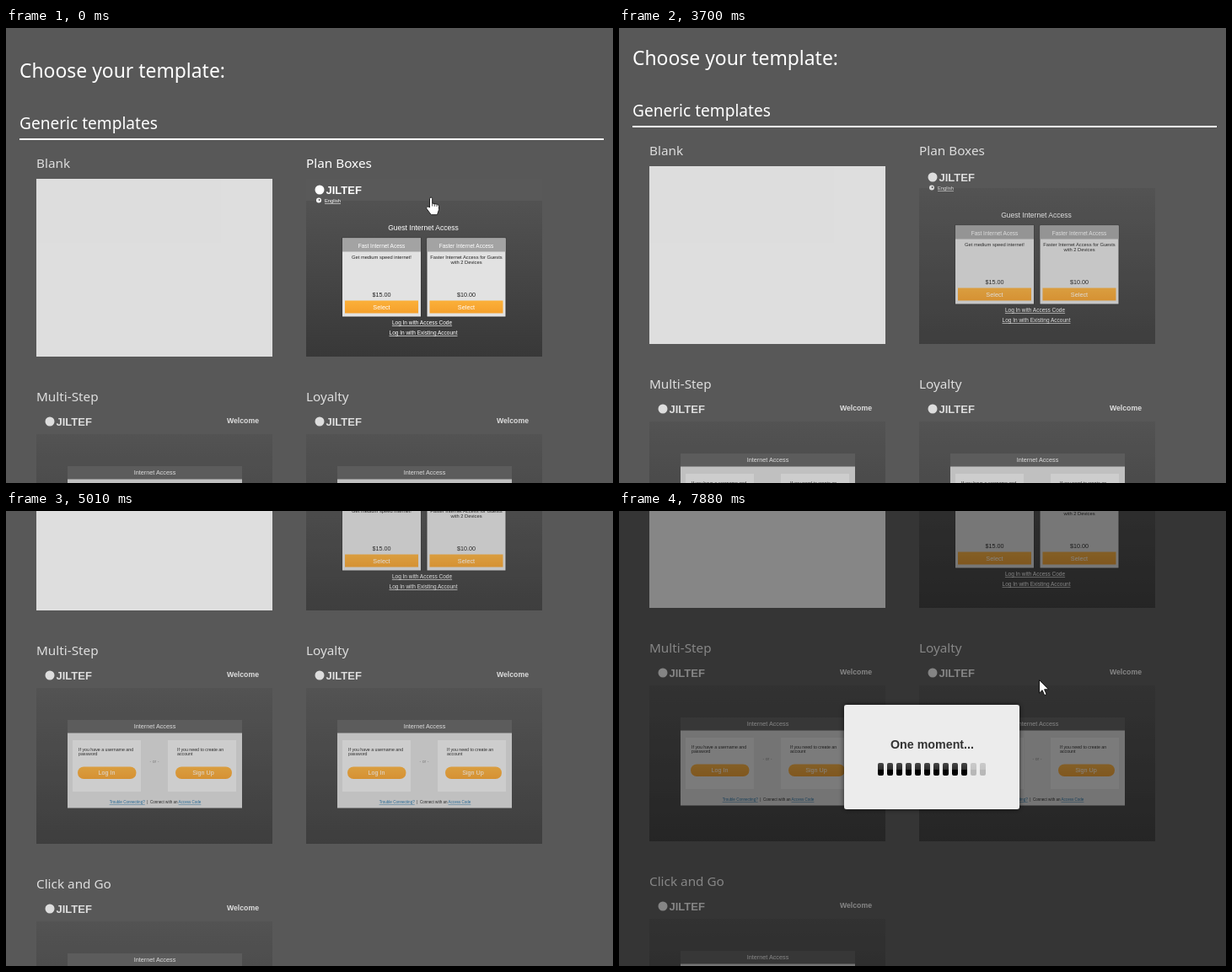
Write an HTML page that moves like this. It is 720 px wide and 540 px high and loops after 8000 ms.

```html
<!DOCTYPE html>
<html lang="en">
<head>
<meta charset="utf-8">
<title>Choose your template</title>
<style>
  html, body { margin: 0; width: 100%; height: 100%; overflow: hidden; background: #585858; }
  svg { display: block; width: 100vw; height: 100vh; }
  text { font-family: "Liberation Sans", Arial, sans-serif; fill: #fff; white-space: pre; }
  .heading { font-family: "Noto Sans", "Open Sans", sans-serif; }
  .item { font-size: 15.3px; }
  .mid { text-anchor: middle; }
  .dark { fill: #222; }
  .link { text-decoration: underline; }
  .blue { fill: #1d6fa5; }
  .bold { font-weight: bold; }
</style>
</head>
<body>
<svg viewBox="0 0 720 540">
  <defs>
    <linearGradient id="body" x2="0" y2="1">
      <stop stop-color="#525252"/><stop offset=".55" stop-color="#444"/><stop offset="1" stop-color="#383838"/>
    </linearGradient>
    <linearGradient id="orange" x2="0" y2="1">
      <stop stop-color="#fbb03a"/><stop offset="1" stop-color="#f5a02b"/>
    </linearGradient>
    <linearGradient id="bar" x2="0" y2="1">
      <stop stop-color="#484848"/><stop offset=".5" stop-color="#2c2c2c"/><stop offset=".5"/>
    </linearGradient>
    <linearGradient id="barOff" x2="0" y2="1">
      <stop stop-color="#cacaca"/><stop offset=".5" stop-color="#c4c4c4"/><stop offset=".5" stop-color="#b8b8b8"/>
    </linearGradient>
    <filter id="shadow" x="-20%" y="-20%" width="140%" height="140%">
      <feDropShadow dx="0" dy="0" stdDeviation="3" flood-opacity=".65"/>
    </filter>

    <g id="logo">
      <circle cx="16" cy="11" r="5.5" fill="#fff"/>
      <text class="bold" x="23.5" y="15.7" font-size="13">JILTEF</text>
    </g>

    <g id="frame">
      <rect width="280" height="211" fill="#595959"/>
      <rect y="26" width="280" height="185" fill="url(#body)"/>
    </g>

    <g id="planBox">
      <rect x="-1" y="-1" width="95" height="95" fill="#000" opacity=".18"/>
      <rect width="93" height="93" fill="#e2e2e2"/>
      <rect width="93" height="16" fill="#a3a3a3"/>
      <rect x="3" y="74" width="87" height="15" fill="url(#orange)"/>
      <text class="mid" x="46.5" y="84" font-size="7.3">Select</text>
    </g>

    <g id="login">
      <use href="#frame"/>
      <use href="#logo"/>
      <text class="bold" x="226" y="13" font-size="8.7">Welcome</text>
      <rect x="37" y="64" width="207" height="104.5" fill="#dadada"/>
      <rect x="37" y="64" width="207" height="15.5" fill="#5e5e5e"/>
      <text class="mid" x="140.5" y="74.3" font-size="7.25">Internet Access</text>
      <path d="M43 88h81v61H43zM156 88h81v61h-81z" fill="#ebebeb"/>
      <g font-size="5.25">
        <text class="dark" x="50" y="100.5">If you have a username and</text>
        <text class="dark" x="50" y="106">password</text>
        <text class="dark" x="167" y="100.5">If you need to create an</text>
        <text class="dark" x="167" y="106">account</text>
        <text class="mid" x="140" y="115" style="fill:#888">- or -</text>
      </g>
      <rect x="49" y="119.5" width="69.5" height="14.5" rx="7.2" fill="url(#orange)"/>
      <rect x="165" y="119.5" width="67" height="14.5" rx="7.2" fill="url(#orange)"/>
      <g class="mid" font-size="7.2">
        <text x="83.5" y="129.3">Log In</text>
        <text x="198" y="129.3">Sign Up</text>
      </g>
      <text class="mid dark" x="141" y="163.3" font-size="4.55"><tspan class="link blue">Trouble Connecting?</tspan>  |  Connect with an <tspan class="link blue">Access Code</tspan></text>
    </g>

    <path id="arrow" d="M.5.5v15.6l3.6-3.4 2.6 6 2.5-1.1-2.6-5.8h5z" fill="#fff" stroke="#111"/>
    <g id="hand" stroke="#222" stroke-linejoin="round">
      <path d="M4.5 13V2.6a1.6 1.6 0 0 1 3.2 0V8l6 1.3q1.8.5 1.8 2.2v4.2l-2 6H6.3L1 14.6q-1-2 .8-2.6 1.4-.3 2.7 1z" fill="#fff"/>
      <path d="M7.7 8v3.5M10.3 8.8v3M13 9.4v2.6" fill="none" stroke-width=".8"/>
    </g>
  </defs>

  <rect width="720" height="540" fill="#585858"/>

  <g id="page">
    <text class="heading" x="16" y="59" font-size="22.9">Choose your template:</text>
    <text class="heading" x="16" y="120" font-size="19.1">Generic templates</text>
    <rect x="16" y="131" width="693" height="2" fill="#fff"/>

    <g opacity=".8">
      <text class="heading item" x="36" y="166">Blank</text>
      <rect x="36" y="179" width="280" height="211" fill="#fff"/>
    </g>

    <g id="plans">
      <text class="heading item" x="356" y="166">Plan Boxes</text>
      <g transform="translate(356 179)">
        <use href="#frame"/>
        <use href="#logo" y="2"/>
        <circle cx="15" cy="25.5" r="3" fill="#fff"/>
        <circle cx="15.6" cy="25" r="1" fill="#555"/>
        <text class="link" x="22" y="28" font-size="5.8">English</text>
        <text class="mid" x="139" y="60.5" font-size="8.55">Guest Internet Access</text>
        <use href="#planBox" x="43" y="70.5"/>
        <use href="#planBox" x="143.5" y="70.5"/>
        <g class="mid" font-size="6.5">
          <text x="89.5" y="81.5">Fast Internet Acess</text>
          <text x="190" y="81.5">Faster Internet Access</text>
          <text class="link" x="137.5" y="173">Log In with Access Code</text>
          <text class="link" x="139" y="185">Log In with Existing Account</text>
        </g>
        <g class="mid" font-size="5.75">
          <text class="dark" x="89.5" y="95">Get medium speed internet!</text>
          <text class="dark" x="190" y="95">Faster Internet Access for Guests</text>
          <text class="dark" x="190" y="101">with 2 Devices</text>
        </g>
        <g class="mid" font-size="7.2">
          <text class="dark" x="89.5" y="139.5">$15.00</text>
          <text class="dark" x="190" y="139.5">$10.00</text>
        </g>
      </g>
    </g>

    <g opacity=".8">
      <text class="heading item" x="36" y="443">Multi-Step</text>
      <use href="#login" x="36" y="456"/>
    </g>
    <g id="loyalty">
      <text class="heading item" x="356" y="443">Loyalty</text>
      <use href="#login" x="356" y="456"/>
    </g>
    <g opacity=".8">
      <text class="heading item" x="36" y="720">Click and Go</text>
      <use href="#login" x="36" y="733"/>
    </g>
  </g>

  <rect id="shade" width="720" height="540"/>
  <g id="modal">
    <rect x="267" y="230" width="208" height="124" rx="3" fill="#ececec" filter="url(#shadow)"/>
    <text class="bold" x="322" y="282" font-size="14.25" style="fill:#333">One moment...</text>
    <g id="bars"></g>
  </g>
  <use id="cursor"/>
</svg>

<script>
const LOOP = 8000;
const $ = id => document.getElementById(id);
const set = (el, attrs) => { for (const k in attrs) el.setAttribute(k, attrs[k]); };

// Every track holds [start, ...values]; a value stays until the next start.
const scroll = [[0, 0], [3570, 4], [3700, 15], [3850, 46], [3970, 90], [4130, 150], [4430, 218],
  [4560, 242], [4700, 255], [4860, 265], [5010, 272], [5150, 274], [5280, 275]];
const cursor = [[0, 'hand', 498, 200], [510, 'hand', 517, 200], [630, 'hand', 535, 200],
  [1070, 'hand', 544, 207], [2180, 'hand', 535, 200], [2610, 'arrow', 683, 196], [2740, ''],
  [5990, 'arrow', 651, 214], [6120, 'hand', 538, 206], [6270, 'hand', 515, 203],
  [6390, 'hand', 493, 200], [6820, 'arrow', 498, 200]];
const plansOpacity = [[0, 1], [2610, .9], [2740, .8]];
const loyaltyOpacity = [[0, .8], [6120, 1], [6820, .8]];
const dialog = [[0, 0], [6820, .16], [6940, 1]];
const filled = [[0, 9], [6940, 10], [7090, 12], [7220, 3], [7340, 5], [7480, 6], [7600, 7], [7720, 9], [7880, 10]];

const at = (track, t) => track.findLast(step => step[0] <= t).slice(1);

const bars = Array.from({ length: 12 }, (_, i) => {
  const bar = document.createElementNS('http://www.w3.org/2000/svg', 'rect');
  set(bar, { x: 307 + 11 * i, y: 299, width: 7, height: 15, rx: 2 });
  return $('bars').appendChild(bar);
});

function draw(t) {
  const [kind, x = 0, y = 0] = at(cursor, t);
  const [shown] = at(dialog, t);
  const [count] = at(filled, t);
  set($('page'), { transform: `translate(0 ${-at(scroll, t)[0]})` });
  set($('plans'), { opacity: at(plansOpacity, t)[0] });
  set($('loyalty'), { opacity: at(loyaltyOpacity, t)[0] });
  set($('shade'), { opacity: .4 * shown });
  set($('modal'), { opacity: shown });
  set($('cursor'), { href: '#' + kind, x, y, visibility: kind ? 'visible' : 'hidden' });
  bars.forEach((bar, i) => set(bar, { fill: i < count ? 'url(#bar)' : 'url(#barOff)' }));
}

const start = performance.now();
function tick() {
  draw((performance.now() - start) % LOOP);
  requestAnimationFrame(tick);
}
tick();
</script>
</body>
</html>
```
